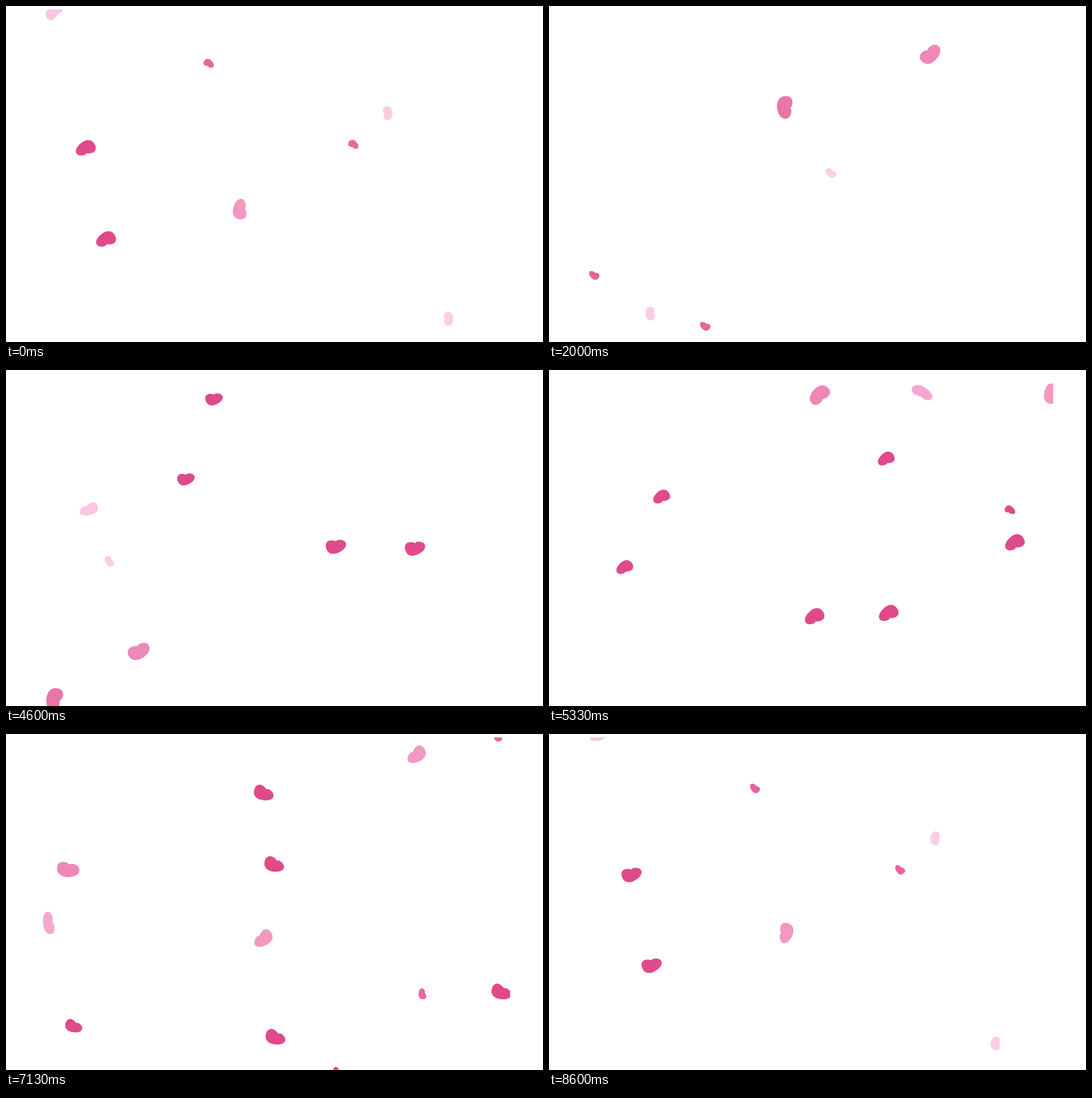
Animation of 947x592 px, one loop 8.63 s. Source, as an HTML page with a canvas:

```html
<!DOCTYPE html>
<html lang="en">
<head>
<meta charset="utf-8">
<title>Falling petals</title>
<style>
  html, body { margin: 0; width: 100%; height: 100%; overflow: hidden; background: #fff; }
  canvas { display: block; }
</style>
</head>
<body>
<canvas id="stage" width="947" height="592"></canvas>
<script>
const ctx = document.getElementById('stage').getContext('2d');
const LOOP = 8.63;              // seconds
const SPIN = -6.5 * 360 / LOOP; // every petal turns at this rate, degrees per second
const rad = deg => deg * Math.PI / 180;
const flocks = [];

// A flock shares colour, speed (px/s) and look; each petal passes (x, y) at its
// time on a heading in degrees, which may bend by some degrees per second.
function flock(color, speed, look, ...petals) {
  flocks.push({ color, speed, look, petals });
}
const at = (time, x, y, heading, bend = 0) => ({ time, x, y, heading, bend });

const rose = { turn: 155, size: 18, plump: .65, taper: .25 };
const bud = { turn: 215, size: 9.7, plump: .65, taper: -.28 };

flock('#e04a8a', 231, rose,
  at(3.53, 751, 130, 133),
  at(4.6, 722, 314, 137.3),
  at(6, 680, 72, 139.8, 2.4),
  at(6, 692, 390, 146.2),
  at(7.13, 454.5, 105, 152.2, 2),
  at(7.13, 873.5, 455.5, 135));
flock('#e04a8a', 331, { ...rose, size: 15.5 },
  at(4.6, 367.5, 51, 134.6),
  at(4.6, 318, 192, 140),
  at(6, 426, 301, 141.4, 3.2));
flock('#e8659e', 233, bud,
  at(8.6, 362.5, 95.5, 126.8),
  at(8.6, 618.5, 239, 136.6),
  at(6, 896, 250, 128));
flock('#e04a8a', 233, bud,
  at(6, 727.5, 376.5, 123.5));
flock('#fccde6', 304, { turn: 268, size: 12.2, plump: .68, taper: -.05 },
  at(8.6, 681, 183.5, 144.5),
  at(8.6, 787.5, 545, 138));
flock('#fdcee8', 300, { turn: 220, size: 10.5, plump: .63, taper: 0 },
  at(2, 497, 294.5, 135),
  at(3.53, 466.5, 188, 152.3));
flock('#fac6e1', 265, { turn: 145, size: 17, plump: .55, taper: -.25 },
  at(3.53, 385, 93, 147.3),
  at(6, 819, 471, 140),
  at(8.6, 88, 2, 110));
flock('#ee88b6', 231, { turn: 142, size: 20, plump: .63, taper: .12 },
  at(2, 673.5, 85.5, 136.9),
  at(6, 340, 116.5, 151.9));
flock('#e975a9', 200, { turn: 274, size: 20, plump: .66, taper: .15 },
  at(2, 415.5, 178.5, 113.4, 6.2));
flock('#f298c1', 298, { turn: 95, size: 18, plump: .64, taper: -.25 },
  at(6, 724.5, 160.5, 143.4),
  at(7.13, 724.5, 37.5, 134.3));
flock('#f5a8cf', 363, { turn: 215, size: 20, plump: .47, taper: -.1 },
  at(6, 441.5, 148.5, 153.3));

// Bean with a small nick on top; taper narrows its right end
function petalShape({ size, plump, taper }) {
  const path = new Path2D();
  const q = (u, v) => [u * size, v * size * plump * (1 - taper * u)];
  const curve = (a, b, c) => path.bezierCurveTo(...q(...a), ...q(...b), ...q(...c));
  const nick = .4 * taper;
  path.moveTo(...q(-1, -.15));
  curve([-1, -.65], [-.75, -.98], [-.4, -.98]);
  curve([-.2, -.98], [nick - .1, -.9], [nick, -.77]);
  curve([nick + .1, -.9], [.2, -.98], [.4, -.98]);
  curve([.75, -.98], [1, -.65], [1, -.15]);
  curve([1, .55], [.6, 1], [0, 1]);
  curve([-.6, 1], [-1, .55], [-1, -.15]);
  return path;
}
for (const f of flocks) f.shape = petalShape(f.look);

function drawPetal(f, p, time, turn) {
  const dt = time - p.time, course = rad(p.heading + p.bend * dt);
  ctx.save();
  ctx.translate(p.x + f.speed * dt * Math.cos(course), p.y + f.speed * dt * Math.sin(course));
  ctx.rotate(rad(turn));
  ctx.fill(f.shape);
  ctx.restore();
}

function draw(t) {
  ctx.clearRect(0, 0, 947, 592);
  ctx.save();
  ctx.beginPath();
  ctx.rect(0, 6, 889, 586);
  ctx.clip();
  for (const f of flocks) {
    ctx.fillStyle = f.color;
    const turn = f.look.turn + SPIN * t;
    for (const p of f.petals)
      for (const time of [t, t + LOOP]) drawPetal(f, p, time, turn);
  }
  ctx.restore();
}

const start = performance.now();
function tick() {
  draw((performance.now() - start) / 1000 % LOOP);
  requestAnimationFrame(tick);
}
tick();
</script>
</body>
</html>
```
